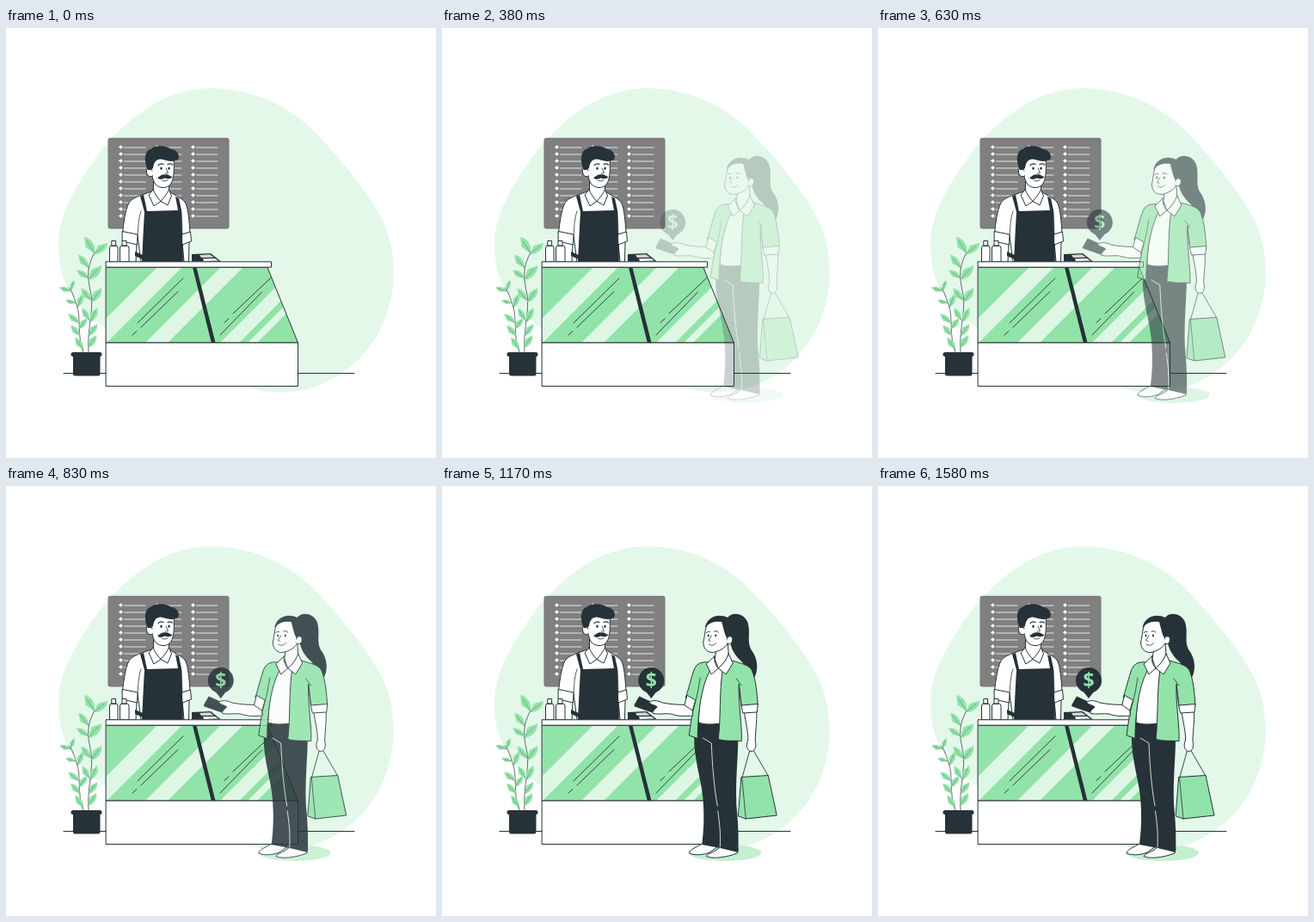
An HTML page with a canvas that plays this animation: 500x500 px, repeating every 1.62 s.

```html
<!DOCTYPE html>
<html lang="en">
<head>
<meta charset="utf-8">
<title>Shop counter</title>
<style>
  html, body { margin: 0; width: 100%; height: 100%; overflow: hidden; background: #fff; }
  canvas { display: block; width: 500px; height: 500px; }
</style>
</head>
<body>
<canvas id="stage"></canvas>
<script>
const SIZE = 500, LOOP = 1620, FPS = 24, SLIDE_MS = 1500, SLIDE_PX = 30, FIRST_STEP = 4;
const INK = '#263238', GREEN = '#92e3a9', PALE = '#e3f8e9', WHITE = '#fff';
const scale = window.devicePixelRatio || 1;

function setup(canvas) {
  canvas.width = canvas.height = SIZE * scale;
  const ctx = canvas.getContext('2d');
  ctx.scale(scale, scale);
  ctx.lineJoin = ctx.lineCap = 'round';
  return ctx;
}

function makePen() {
  const ctx = setup(document.createElement('canvas'));
  const shape = (d, fill, stroke, width = 1) => {
    const path = new Path2D(d);
    if (fill) { ctx.fillStyle = fill; ctx.fill(path); }
    if (stroke) { ctx.strokeStyle = stroke; ctx.lineWidth = width; ctx.stroke(path); }
  };
  return {
    ctx,
    fill: (d, color) => shape(d, color),
    line: (d, width, color = INK) => shape(d, null, color, width),
    outlined: (d, color = WHITE) => shape(d, color, INK),
    ellipse(x, y, rx, ry, color) {
      ctx.fillStyle = color;
      ctx.beginPath();
      ctx.ellipse(x, y, rx, ry, 0, 0, Math.PI * 2);
      ctx.fill();
    },
    box(x, y, w, h, r, color) {
      ctx.fillStyle = color;
      ctx.beginPath();
      ctx.roundRect(x, y, w, h, r);
      ctx.fill();
    }
  };
}

function drawMenu({ box, fill, line }) {
  box(118.5, 127.8, 141, 105.8, 3, '#747474');
  box(119.5, 128.8, 139, 103.8, 2, '#808080');
  for (const x of [133.5, 175.5, 217.5]) {
    for (let row = 0; row < 11; row++) {
      const y = 138.5 + row * 8;
      fill(`M${x - 2.5} ${y}l2.5 -2.3 2.5 2.3 -2.5 2.3Z`, WHITE);
      line(`M${x + 4} ${y + 0.5}h24.5`, 1, '#e6e6e6');
    }
  }
}

function drawPlant({ box, fill, line }) {
  const leaf = (x, y, tipX, tipY) => {
    const dx = tipX - x, dy = tipY - y;
    const side = s => `${x + dx * 0.3 - dy * s} ${y + dy * 0.3 + dx * s} ` +
      `${x + dx * 0.75 - dy * s} ${y + dy * 0.75 + dx * s}`;
    fill(`M${x} ${y}C${side(0.28)} ${tipX} ${tipY}C${side(-0.28)} ${x} ${y}Z`, GREEN);
    line(`M${x} ${y}L${x + dx * 0.75} ${y + dy * 0.75}`, 0.5, '#4d7a5e');
  };
  line('M96 377C94 350 102 330 99 310C94 288 94 278 103 261', 0.7);
  line('M90 377C82 358 88 336 82 322C78 310 77 306 73 302', 0.7);
  const leaves = [
    [103, 262, 91, 243], [102, 263, 118, 250], [96, 279, 84, 264], [95, 293, 111, 276],
    [96, 291, 82, 282], [99, 319, 111, 302], [99, 317, 87, 303], [98, 342, 106, 325],
    [97, 340, 88, 326], [96, 358, 106, 344], [95, 372, 105, 357],
    [75, 305, 79, 293], [75, 306, 62, 302], [81, 320, 69, 317], [83, 325, 89, 309],
    [85, 343, 72, 333], [85, 350, 94, 337], [86, 358, 75, 346], [90, 374, 80, 360]
  ];
  leaves.forEach(points => leaf(...points));
  box(75.5, 377, 36, 5, 2.5, INK);
  fill('M78 380H109.5V402Q109.5 404.5 107 404.5H80.5Q78 404.5 78 402Z', INK);
}

function drawBarista({ fill, line, outlined, ellipse }) {
  outlined('M138 248L137 272H151L152 250Z');
  outlined('M205 250L207 272H212.5L213 249Z');
  outlined('M169 190C160 194 148 196 143 203C138 214 137 227 135.5 238L153 241L157 272H206L205 240L214 238C213 224 212 211 209 204C206 198 198 196 190 190Z');
  line('M157 213C153 225 154 235 153 241M204 214L205 240', 0.8);
  outlined('M135.5 236.5L153 240L152.5 252L135.5 248Z');
  outlined('M204.5 240L214.5 237L215.5 248L205 252Z');
  fill('M150 260L159 264V269L150 265Z', INK);
  fill('M156 195.5L160 194L164 213L200 212L197 196L201 198L204 212C204 230 206 250 205.5 272H158C159 250 160 230 161 214Z', INK);
  outlined('M171.5 179V191C174 196 178 200 180 202C184 199 188 195 189.5 191V180Z');
  outlined('M171 188L166 194L172 207L180 201.5C176 197 173 193 171 188Z');
  outlined('M189.5 188L192.5 195L188 206L180 201.5C184 197 187 193 189.5 188Z');
  outlined('M169 154C168 165 170 177 174 182C178 186 186 187 190 183C195 179 196 167 195 153L180 149Z');
  outlined('M170 166C168 161 163 162 163.5 167C164 172 167 174 170.5 172');
  fill('M165 165C160 155 161 142 169 140.5C173 135.5 188 137 192 141C199 141 203 149 200 153C195 156 188 155 183 153C176 151 172 155 171 163L168 165Z', INK);
  ellipse(180.5, 163.2, 1.2, 1.6, INK);
  ellipse(189.5, 163.2, 1.2, 1.6, INK);
  line('M177 159.5Q180 157 183 158.5M188 158.5Q191 157 193.5 159', 1.2);
  line('M186 163L188.5 168.5L185.5 169', 0.8);
  fill('M176 174C179 173 181 169.5 185 170.5C189 169.5 190 172.5 193.5 173C191 176.5 187 175 184.5 174.5C181 176.5 178 176.5 176 174Z', INK);
  line('M181.5 177.5Q185 179 188 177', 0.8);
}

function drawCounter({ ctx, fill, line, outlined }) {
  outlined('M120.5 271.5V256Q120.5 253 123 253H127.5Q130 253 130 256V271.5ZM122.8 253V247.5H127.6V253Z');
  outlined('M132.5 271.5V256Q132.5 253 135 253H140.5Q143 253 143 256V271.5ZM135 253V247.5H140V253Z');
  fill('M216 263L238 262L250 271.5H216Z', INK);
  fill('M225 264L237 263.3L242 266.8L227 267Z', '#d5d5d5');
  fill('M229 268.3L243 268L247 270.6L230 271Z', WHITE);

  const glass = 'M116.5 278.5H304L339.5 366H116.5Z';
  fill(glass, GREEN);
  ctx.save();
  ctx.clip(new Path2D(glass));
  // Each reflection is a 45° band, given by its span along the lower edge.
  for (const [from, to] of [[88, 117], [162, 188], [249, 271], [281, 292]]) {
    fill(`M${from} 366H${to}L${to + 88} 278H${from + 88}Z`, '#def7e5');
  }
  ctx.restore();
  fill('M217 278.5H221.5L243.5 366H238.8Z', INK);
  line('M206 291L153 343M200 306.5L157 348M152 352.5L147 357M308 290.5L264 332M259 338L254 342.5M297.5 307L249 357', 0.9);
  line(glass, 1);
  outlined('M116.5 271.8H308.5V278.2H116.5Z');
  outlined('M116.5 366H339.5V416.5H116.5Z');
}

function drawShop(pen) {
  pen.fill('M240 70C290 71 330 92 356 118C395 158 418 188 436 220C452 250 455 295 445 325C432 372 395 410 345 421C318 427 285 423 262 408C220 380 150 375 110 345C75 318 60 290 61 250C62 216 81 184 105 150C138 106 185 69 240 70Z', PALE);
  drawMenu(pen);
  pen.line('M67 401.5H405', 1);
  drawPlant(pen);
  drawBarista(pen);
  drawCounter(pen);
}

function drawCustomer({ ctx, fill, line, outlined, ellipse }) {
  ellipse(331, 426.5, 42, 9.5, '#c3f0cf');
  // Shoes and trousers
  outlined('M304 416C298 420 290 422 289 427C296 430 306 429 313 426L323 419Z');
  outlined('M326 419C320 426 310 427 309 430.5C316 434 332 432 345 427L346 422Z');
  fill('M299 274L326 276L346 295C346 315 343 340 344 370C346 390 347 410 346 426L325 421L304 417C306 400 307 385 305 362C303 340 294 315 295 290Z', INK);
  line('M305 293L315 299C316 325 318 350 322 372', 0.8, WHITE);
  line('M322.5 378C324 390 326 402 325 420', 0.8, WHITE);

  // Bag and hanging arm
  line('M360 306L351 338M363 306L381 337', 0.9);
  outlined('M350 338.5L381 336.5L391 383L355 387L346.5 384Z', GREEN);
  line('M350.5 338.5L355 387', 0.8);
  outlined('M353 262C355 276 358 286 357.5 296C355 301 356 307 360.5 308.5C365 309 368 304 366 297C366 286 368 276 367.5 262Z');

  // Ponytail
  fill('M333 154C338 146 352 147 357 158C361 170 356 180 361 190C369 200 371 215 363 226C362 215 355 214 351 205C343 198 338 191 336 178Z', INK);

  // Shirt and jacket
  outlined('M314 204C304 220 301 250 300 275C308 278 318 277 326 276L331 206Z');
  outlined('M312 205C303 204 297 206 294 216C290 228 288 238 285 246L296 252C292 265 291 277 289 290L299 293.5C299 270 302 235 313 215Z', GREEN);
  line('M302 223C300 234 299 243 296 252', 0.8);
  outlined('M336 202C347 206 358 207 362 214C367 226 368 242 369 255L350 256L347 230C346 254 351 280 350 296.5C340 296 331 297 323 294.5C326 270 324 240 328 213Z', GREEN);
  line('M344 224L350 232M347 232C348 242 349 250 350 256', 0.8);
  outlined('M350 255L369 253.5L368 263L352 264Z');

  // Neck, collar and head
  outlined('M321 188L319 201L323 212C329 207 333 202 335 196L334 183Z');
  outlined('M318.5 198L309 207L315 219L323 212C319 207 318 203 318.5 198Z');
  outlined('M335 195L340 206L332 219L323 212C329 207 333 201 335 195Z');
  outlined('M313 156C307 163 308 172 305.5 182C306 190 311 194 317 193.5C325 192 331 188 334 183L333 160L322 153Z');
  fill('M307.5 165C309 153 322 147 334 153C341 158 341 173 337 181L333 177C330 172 329 165 327 158C320 157 313 158 307.5 165Z', INK);
  outlined('M333 178C334 173 340 174 339.5 179C339 183 336 185 333 183');
  ellipse(311.5, 174, 1, 1.4, INK);
  ellipse(320, 174, 1, 1.4, INK);
  line('M309 170.5Q311 168.5 313 169.5M318 169Q321 167.5 323 170', 0.9);
  line('M315 174L311.5 179.5L314 180.5M312 184Q317 187.5 320.5 182.5', 0.8);

  // Card and reaching arm
  fill('M231 244.5L253 254.5Q254 255.5 253.5 257L249 264.5L226 256.5Q224.5 255.5 225.5 254Z', INK);
  outlined('M292 254C280 255 268 254 258 252C252 249 247 249 242.5 251C244 255 249 254 252 257C249 260 246 262 247 264.5C254 266 262 264 268 265C276 268 286 268 293 267Z');
  outlined('M287 243.5L296.5 249L293 261L284 255Z');

  // Price marker
  ellipse(245, 226, 15, 15, INK);
  fill('M238 238H252L245 247Z', INK);
  ctx.fillStyle = GREEN;
  ctx.font = 'bold 23px "Open Sans", sans-serif';
  ctx.textAlign = 'center';
  ctx.fillText('$', 245, 233.5);
}

const bezier = (a, b, s) => 3 * (1 - s) ** 2 * s * a + 3 * (1 - s) * s * s * b + s ** 3;

// Ease with a slight overshoot: cubic-bezier(.36, -.01, .5, 1.38)
function ease(x) {
  let low = 0, high = 1;
  for (let i = 0; i < 24; i++) {
    const mid = (low + high) / 2;
    if (bezier(0.36, 0.5, mid) < x) low = mid; else high = mid;
  }
  return bezier(-0.01, 1.38, low);
}

const view = setup(document.getElementById('stage'));
const shop = makePen(), customer = makePen();
drawShop(shop);

// Drawn at its shifted place, so that thin outlines stay sharp between pixels.
function placeCustomer(dx) {
  const { ctx } = customer;
  ctx.clearRect(0, 0, SIZE, SIZE);
  ctx.save();
  ctx.translate(dx, 0);
  drawCustomer(customer);
  ctx.restore();
}

function render(now) {
  const step = Math.floor((now % LOOP) * FPS / 1000 + 0.13);
  view.globalAlpha = 1;
  view.fillStyle = WHITE;
  view.fillRect(0, 0, SIZE, SIZE);
  view.drawImage(shop.ctx.canvas, 0, 0, SIZE, SIZE);
  if (step >= FIRST_STEP) {
    const progress = ease(Math.min(1, step * 1000 / FPS / SLIDE_MS));
    placeCustomer(SLIDE_PX * (1 - progress));
    view.globalAlpha = Math.min(1, Math.max(0, progress));
    view.drawImage(customer.ctx.canvas, 0, 0, SIZE, SIZE);
  }
}

let start;
function tick(now) {
  start ??= now;
  render(now - start);
  requestAnimationFrame(tick);
}
render(0);
requestAnimationFrame(tick);
</script>
</body>
</html>
```
